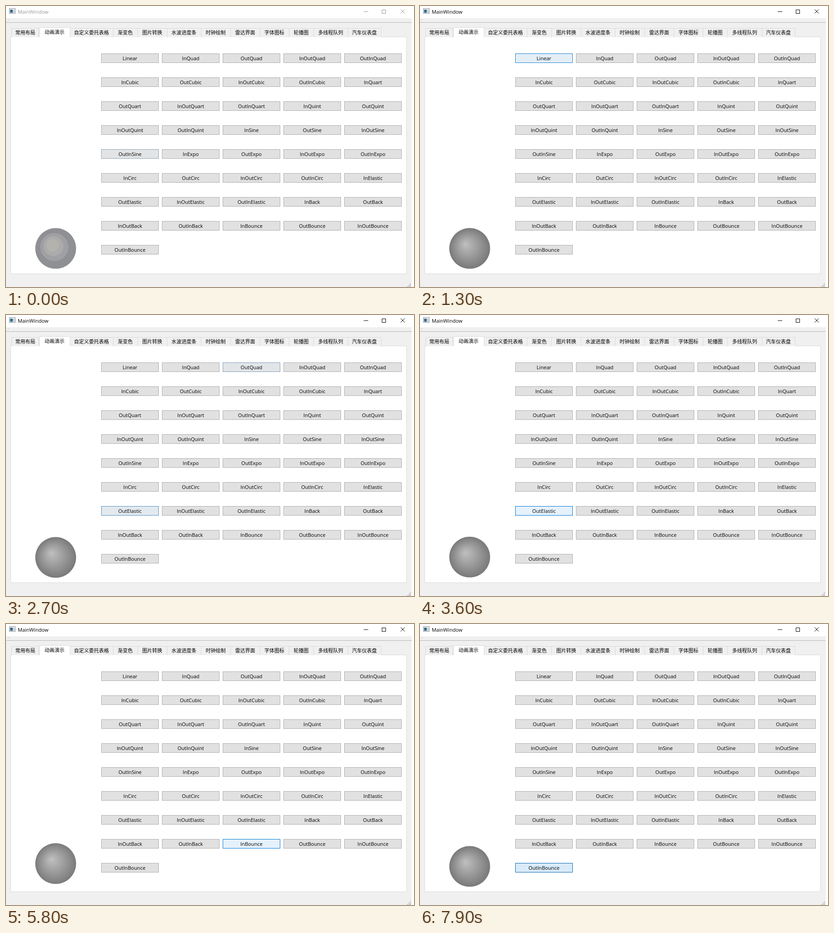
Recreate the animation shown at these times as an HTML page. Size 900 by 622 pixels, loop 8 s.

```html
<!DOCTYPE html>
<html lang="zh-CN">
<head>
<meta charset="utf-8">
<title>MainWindow</title>
<style>
  html, body { margin: 0; width: 100%; height: 100%; overflow: hidden; background: #fff; }
  svg { display: block; width: 900px; height: 622px; }
  text { font: 11.1px "Open Sans", "Noto Sans", sans-serif; }
  .mid { text-anchor: middle; }
  .tab { font: 11px "Noto Sans CJK SC", "Noto Sans CJK", sans-serif; }
  .crisp { shape-rendering: crispEdges; }
</style>
</head>
<body>
<svg id="stage" viewBox="0 0 900 622">
  <defs>
    <radialGradient id="smooth" fx=".39" fy=".39">
      <stop offset="0" stop-color="#c0c0c0"/>
      <stop offset="1" stop-color="#797979"/>
    </radialGradient>
    <radialGradient id="banded" fx=".39" fy=".39">
      <stop offset=".31" stop-color="#b3b2ad"/>
      <stop offset=".31" stop-color="#ababab"/>
      <stop offset=".49" stop-color="#ababab"/>
      <stop offset=".49" stop-color="#a0a0a4"/>
      <stop offset=".69" stop-color="#a0a0a4"/>
      <stop offset=".69" stop-color="#8f9093"/>
    </radialGradient>
    <clipPath id="page"><rect x="11" y="69" width="872" height="523"/></clipPath>
  </defs>

  <g class="crisp">
    <rect y="27" width="895" height="595" fill="#f0f0f0"/>
    <rect y="36" width="895" height="1" fill="#b4b4b4"/>
    <rect x="4" y="30" width="2" height="1" fill="#a8a8a8"/>
    <rect x="10.5" y="68.5" width="873" height="524" fill="#fff" stroke="#dcdcdc"/>
  </g>

  <g class="crisp">
    <rect x="7.5" y="5.5" width="13" height="11" fill="#f4f4f4" stroke="#8a8f94"/>
    <rect x="9" y="8" width="6" height="7" fill="#2f6f96"/>
    <rect x="16" y="8" width="3" height="7" fill="#c4c8cb"/>
  </g>
  <text id="title" x="26" y="16.5">MainWindow</text>
  <g id="controls" fill="none">
    <path class="crisp" d="M789 12.5h10M829.5 8.5h8v8h-8z"/>
    <path d="M870.5 7.5l9 9m0-9l-9 9"/>
  </g>

  <g id="tabs"></g>
  <g id="buttons"></g>
  <g id="grip" class="crisp" fill="#b5b5b5"></g>
  <g clip-path="url(#page)"><circle id="ball" cx="109.6" r="45"/></g>
</svg>

<script>
const LOOP = 8000, STEP = 100, RUN = 893;
const TOP = 126, TRAVEL = 410.6;
const $ = id => document.getElementById(id);

function add(parent, tag, attrs, text) {
  const el = document.createElementNS("http://www.w3.org/2000/svg", tag);
  for (const k in attrs) el.setAttribute(k, attrs[k]);
  if (text) el.textContent = text;
  return parent.appendChild(el);
}

// Tabs
const tabNames = "常用布局 动画演示 自定义委托表格 渐变色 图片转换 水波进度条 时钟绘制 雷达界面 字体图标 轮播图 多线程队列 汽车仪表盘".split(" ");
const tabEdges = [12, 73, 141, 236, 290, 355, 430, 495, 560, 624, 678, 754, 827];
tabNames.forEach((name, i) => {
  const x = tabEdges[i], w = tabEdges[i + 1] - x, active = i === 1;
  const y = active ? 47 : 49;
  add($("tabs"), "path", {
    class: "crisp", d: `M${x + .5} ${active ? 69 : 68.5}V${y + .5}h${w - 1 + (i !== 0)}V${active ? 69 : 68.5}`,
    fill: active ? "#fff" : "#f0f0f0", stroke: "#d9d9d9"
  });
  if (active) add($("tabs"), "rect", { class: "crisp", x: x + 1, y: 68, width: w - 1, height: 2, fill: "#fff" });
  add($("tabs"), "text", { class: "tab mid", x: x + w / 2, y: active ? 62 : 63 }, name);
});

// Easing buttons
const families = ["Quad", "Cubic", "Quart", "Quint", "Sine", "Expo", "Circ", "Elastic", "Back", "Bounce"];
const curves = ["Linear", ...families.flatMap(f => ["In", "Out", "InOut", "OutIn"].map(p => p + f))];
const buttons = curves.map((name, i) => {
  const x = 210 + 134 * (i % 5), y = 105 + 53 * Math.floor(i / 5);
  const box = add($("buttons"), "rect", { class: "crisp", x: x + .5, y: y + .5, width: 126, height: 20 });
  add($("buttons"), "text", { class: "mid", x: x + 63.5, y: y + 14.5 }, name);
  return box;
});

// Resize grip
for (let r = 0; r < 3; r++)
  for (let c = 2 - r; c < 3; c++)
    add($("grip"), "rect", { x: 885 + 3 * c, y: 614 + 3 * r, width: 2, height: 2 });

function outBounce(t) {
  const k = 7.5625;
  if (t < 4 / 11) return k * t * t;
  if (t < 8 / 11) return k * (t - 6 / 11) ** 2 + .75;
  if (t < 10 / 11) return k * (t - 9 / 11) ** 2 + .9375;
  return k * (t - 21 / 22) ** 2 + .984375;
}
const ease = {
  Linear: t => t,
  OutQuad: t => 1 - (1 - t) ** 2,
  OutElastic: t => 2 ** (-10 * t) * Math.sin((t - .075) * 2 * Math.PI / .3) + 1,
  InBounce: t => 1 - outBounce(1 - t),
  OutBounce: outBounce
};

// Pointer visits: curve, enter, press, release, leave
const visits = [
  ["OutInSine", -3000, -2500, -2400, -250],
  ["Linear", 130, 200, 274, 1250],
  ["OutQuad", 1350, 1480, 1560, 2480],
  ["OutElastic", 2620, 2710, 2790, 3800],
  ["InBounce", 4650, 4860, 4947, 5950],
  ["OutBounce", 6000, 6120, 6200, 7350],
  ["OutInBounce", 7550, 7850, 8100, 9000]
];
const fills = [[225, 225, 225], [229, 241, 251], [204, 228, 247]];
const edges = [[173, 173, 173], [0, 120, 215], [0, 84, 153]];

const clamp = v => Math.min(1, Math.max(0, v));
const ramp = (t, from, length) => clamp((t - from) / length);

// 0 = idle, 1 = hovered, 2 = pressed
const level = (t, [, enter, press, release, leave]) =>
  ramp(t, enter, 150) + ramp(t, press, 100) - ramp(t, release, 350) - ramp(t, leave, 300);

function mix(stops, v) {
  const i = Math.min(1, Math.floor(v)), f = v - i;
  return `rgb(${stops[i].map((a, k) => Math.round(a + (stops[i + 1][k] - a) * f))})`;
}

function progress(t) {
  const run = visits.filter(v => ease[v[0]] && v[3] <= t).pop();
  return run && t < run[3] + RUN ? ease[run[0]]((t - run[3]) / RUN) : 1;
}

function draw(t) {
  const idle = t < 100;
  $("title").setAttribute("fill", idle ? "#999" : "#000");
  $("controls").setAttribute("stroke", idle ? "#999" : "#000");

  const p = progress(t);
  $("ball").setAttribute("cy", TOP + TRAVEL * p);
  $("ball").setAttribute("opacity", clamp(p));
  $("ball").setAttribute("fill", idle ? "url(#banded)" : "url(#smooth)");

  buttons.forEach((box, i) => {
    const visit = visits.find(v => v[0] === curves[i]);
    const v = visit ? Math.max(0, level(t, visit)) : 0;
    box.setAttribute("fill", mix(fills, v));
    box.setAttribute("stroke", mix(edges, v));
  });
}

const start = performance.now();
function tick() {
  const t = Math.max(0, performance.now() - start) % LOOP;
  draw(Math.floor(t / STEP) * STEP);
  requestAnimationFrame(tick);
}
tick();
</script>
</body>
</html>
```
